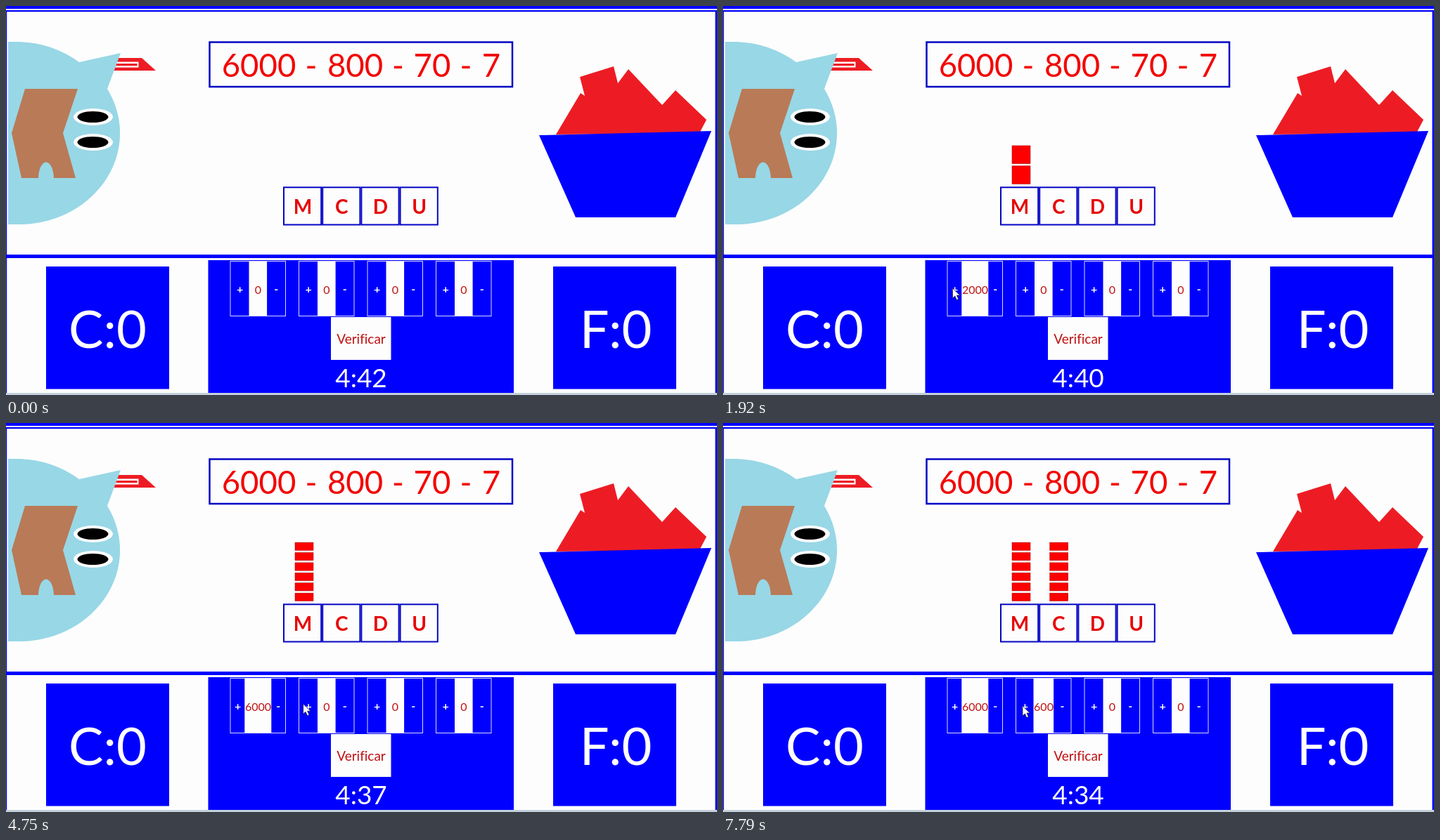
Animation, 1011 px wide and 554 px high, one loop 8 s. Source, as an HTML page:

```html
<!DOCTYPE html>
<html lang="es">
<head>
<meta charset="utf-8">
<title>Restas</title>
<style>
  html, body { margin: 0; width: 100%; height: 100%; overflow: hidden; background: #fdfdfd; }
  svg { display: block; width: 100vw; height: 100vh; }
  text { font-family: Lato, "Open Sans", sans-serif; text-anchor: middle; font-variant-ligatures: none; }
  .blue { fill: #0000fe; }
  .red { fill: #ed1c24; }
  .box { fill: none; stroke: #0505c4; }
  .sum { font-size: 45.5px; fill: #f30505; }
  .unit { font-size: 28px; font-weight: bold; fill: #e60808; }
  .score { font-size: 74px; fill: #fff; }
  .clock { font-size: 37px; fill: #fff; }
  .check { font-size: 19px; fill: #c01010; }
  .value { font-size: 16px; fill: #c01010; }
  .sign { font-size: 16px; font-weight: bold; fill: #fff; }
  .block { fill: #fe0000; stroke: #a00000; stroke-width: .5; }
</style>
</head>
<body>
<svg id="stage" viewBox="0 0 1011 554" preserveAspectRatio="none">
  <rect width="1011" height="554" fill="#fdfdfd"/>
  <g class="blue">
    <rect width="1011" height="4"/>
    <rect y="6" width="1011" height="2.2"/>
    <rect y="354" width="1011" height="5"/>
    <rect y="6" width="1.2" height="545"/>
    <rect x="1008.5" y="6" width="2.5" height="545"/>
    <rect x="57" y="371" width="175" height="174.500"/>
    <rect x="287.500" y="362" width="434.500" height="189"/>
    <rect x="778" y="371" width="175" height="174.500"/>
  </g>
  <rect y="551" width="1011" height="3" fill="#c3d0dc"/>

  <!-- animal -->
  <path class="red" d="M150 74H193L213 92H150Z"/>
  <path d="M156 79.500H188.500V87.500H154V85.200H186.500V82H156Z" fill="#fff"/>
  <path d="M3 51H20A144 130 0 0 1 104 80L163 67L144 118A144 130 0 0 1 24 311H3Z" fill="#98d7e6"/>
  <path d="M27 118H102L81 181L99 245H68C67 215 47 215 46 245H22L8 181Z" fill="#b97a57"/>
  <g id="eyes"></g>

  <!-- basket -->
  <path class="red" d="M782 183L817 124L823 128L816 101L864 86L870 110L885 90L933 141L952 120L996 162L986 181Z"/>
  <path class="blue" d="M758 184L1003 178L952 301H810Z"/>

  <rect class="box" x="289.500" y="51.500" width="430.500" height="63.500" stroke-width="2.500"/>
  <g id="sum"></g>
  <g id="units"></g>
  <g id="blocks"></g>
  <g id="cells"></g>

  <rect x="462" y="443" width="85.500" height="61" fill="#fdfdfd"/>
  <text class="check" x="505" y="481">Verificar</text>
  <text class="clock" id="clock" x="505" y="543"></text>
  <text class="score" x="144.500" y="487">C:0</text>
  <text class="score" x="867" y="487">F:0</text>
  <path id="cursor" d="M0 0V14L3.300 11L5.800 16.500L8.300 15.400L5.900 10.100H10.300Z"
        fill="#fff" stroke="#222" stroke-width=".7"/>
</svg>
<script>
const LOOP = 8000;
const $ = id => document.getElementById(id);

function add(parent, tag, attrs, text) {
  const el = document.createElementNS("http://www.w3.org/2000/svg", tag);
  for (const k in attrs) el.setAttribute(k, attrs[k]);
  if (text !== undefined) el.textContent = text;
  parent.appendChild(el);
  return el;
}

function set(el, attrs) {
  for (const k in attrs) el.setAttribute(k, attrs[k]);
}

// Fixed parts
for (const cy of [158, 194]) {
  add($("eyes"), "ellipse", { cx: 124, cy, rx: 28, ry: 12, fill: "#fdfdfd" });
  add($("eyes"), "ellipse", { cx: 123.5, cy, rx: 22, ry: 8, fill: "#000" });
}

[["6000", 359.5], ["-", 434], ["800", 496.5], ["-", 557.5], ["70", 606], ["-", 654], ["7", 690]]
  .forEach(([s, x]) => add($("sum"), "text", { class: "sum", x, y: 101 }, s));

[..."MCDU"].forEach((s, i) => {
  const x = 395 + i * 55.2;
  add($("units"), "rect", { class: "box", x, y: 258.3, width: 53.2, height: 53.2, "stroke-width": 2 });
  add($("units"), "text", { class: "unit", x: x + 27, y: 296 }, s);
});

// Counter cells: the white middle widens with the number
const cells = [0, 1, 2, 3].map(i => {
  const x = 319 + i * 97.5, g = $("cells");
  add(g, "rect", { x, y: 363.5, width: 78.5, height: 78, fill: "#0000fe", stroke: "#d8d8ff" });
  const cell = { x, place: 10 ** (3 - i) };
  cell.mid = add(g, "rect", { y: 363.5, height: 78, fill: "#fdfdfd" });
  cell.value = add(g, "text", { class: "value", x: x + 39.5, y: 409.5 });
  cell.plus = add(g, "text", { class: "sign", y: 409 }, "+");
  cell.minus = add(g, "text", { class: "sign", y: 409 }, "-");
  return cell;
});

function setCell(cell, count) {
  const text = String(count * cell.place);
  const half = text.length === 1 ? 12.8 : text === "1000" ? 17.8 : text.length === 4 ? 19 : 14.3;
  const side = (39.3 - half) / 2;
  cell.value.textContent = text;
  set(cell.mid, { x: cell.x + 39.3 - half, width: half * 2 });
  set(cell.plus, { x: cell.x + side + 0.5 });
  set(cell.minus, { x: cell.x + 78.5 - side });
}

const stacks = [411, 464.7].map(x =>
  Array.from({ length: 6 }, () => add($("blocks"), "rect", { class: "block", x, width: 26 })));

// Blocks share a fixed height once there are three or more
function setStack(stack, count) {
  const pitch = 86.5 / Math.max(3, count), height = pitch - 3.2;
  stack.forEach((el, i) => set(el, {
    y: 253.4 - height - i * pitch,
    height,
    visibility: i < count ? "visible" : "hidden"
  }));
}

const clicks = [
  [1080, 1580, 2000, 2130, 2460, 3500],
  [5000, 5420, 5750, 6210, 7210, 7710]
];

const route = [
  [540, 345, 554], [960, 329, 406], [1130, 327.5, 403.5], [1340, 326.5, 402],
  [3920, 326.5, 402], [4300, 372, 396], [4710, 422.5, 400], [5000, 426, 403]
];

const ease = u => u * u * (3 - 2 * u);

function cursorAt(t) {
  let i = 0;
  while (i < route.length - 1 && route[i + 1][0] <= t) i++;
  const a = route[i], b = route[i + 1] || a;
  const u = a === b ? 0 : ease((t - a[0]) / (b[0] - a[0]));
  return [1, 2].map(k => a[k] + (b[k] - a[k]) * u);
}

function draw(t) {
  clicks.forEach((times, i) => {
    const count = times.filter(at => at <= t).length;
    setStack(stacks[i], count);
    setCell(cells[i], count);
  });
  $("clock").textContent = "4:" + (42 - Math.floor((t + 330) / 1000));
  const shown = t >= route[0][0];
  $("cursor").setAttribute("visibility", shown ? "visible" : "hidden");
  if (shown) $("cursor").setAttribute("transform", `translate(${cursorAt(t)})`);
}

setCell(cells[2], 0);
setCell(cells[3], 0);

function tick() {
  draw(performance.now() % LOOP);
  requestAnimationFrame(tick);
}
tick();
</script>
</body>
</html>
```
